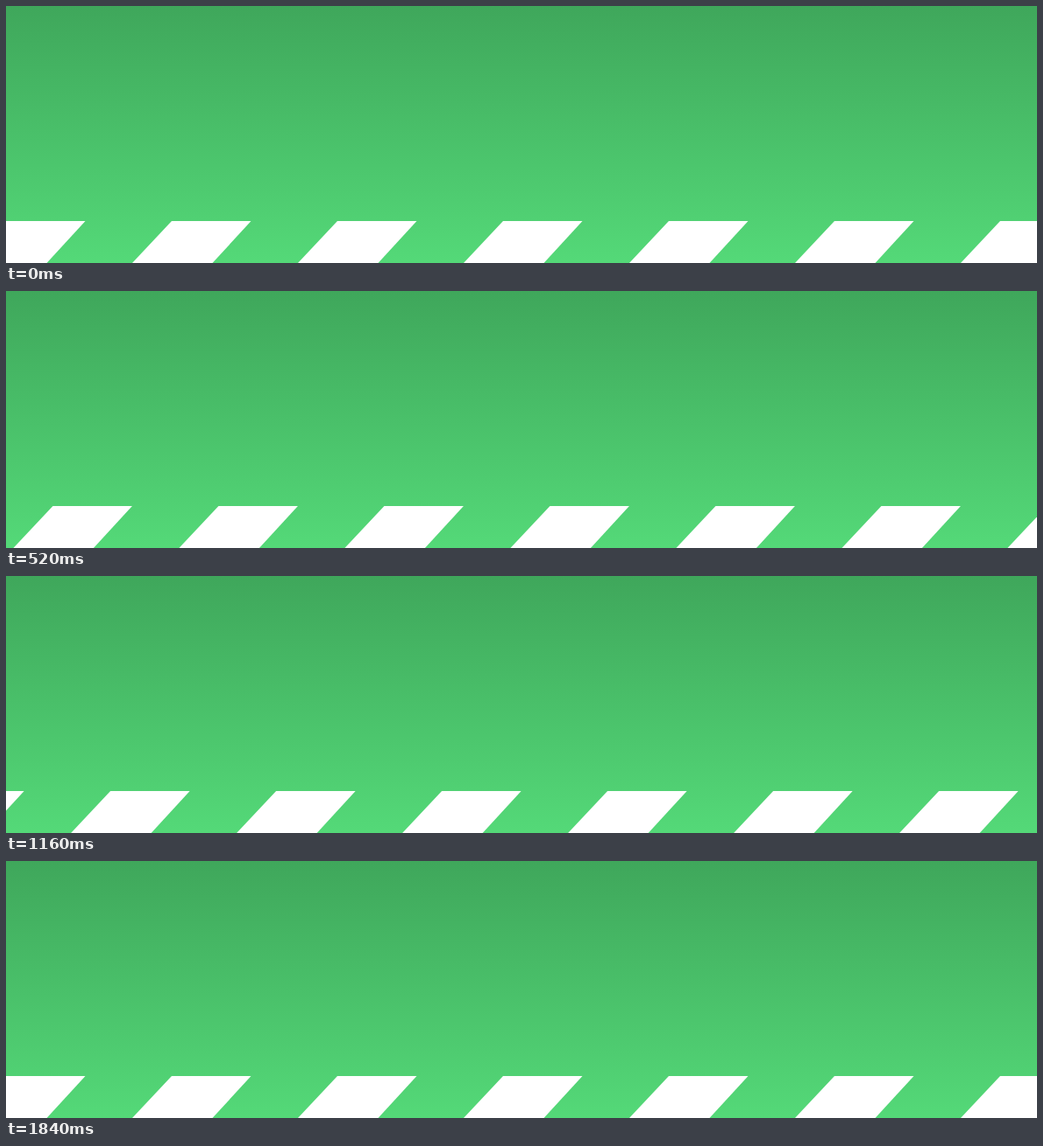
Animation, 1176 px wide and 294 px high, one loop 1.88 s. Source, as an HTML page:

```html
<!DOCTYPE html>
<html lang="en">
<head>
<meta charset="utf-8">
<title>Moving stripes</title>
<style>
  html, body { margin: 0; width: 100%; height: 100%; overflow: hidden; }
  body { background: linear-gradient(#3fa75b, #54d978); }
  svg { display: block; width: 1176px; height: 294px; }
</style>
</head>
<body>
<svg viewBox="0 0 1176 294">
  <defs>
    <path id="stripe" d="M0 246H90.5L46.5 294H-45Z" fill="#fff"/>
  </defs>
  <g id="band"></g>
</svg>
<script>
  const PERIOD = 189;   // distance between stripes
  const STEP = 40;      // ms per pose
  const STEPS = 46;     // steps to travel one period
  const LOOP = STEP * (STEPS + 1);

  const band = document.getElementById('band');
  for (let i = -1; i < 8; i++) {
    const use = document.createElementNS(band.namespaceURI, 'use');
    use.setAttribute('href', '#stripe');
    use.setAttribute('x', i * PERIOD);
    band.append(use);
  }

  const start = performance.now();
  function draw(now) {
    const time = Math.max(0, now - start) % LOOP;
    const shift = PERIOD * Math.floor(time / STEP) / STEPS;
    band.setAttribute('transform', `translate(${shift})`);
    requestAnimationFrame(draw);
  }
  draw(start);
</script>
</body>
</html>
```
